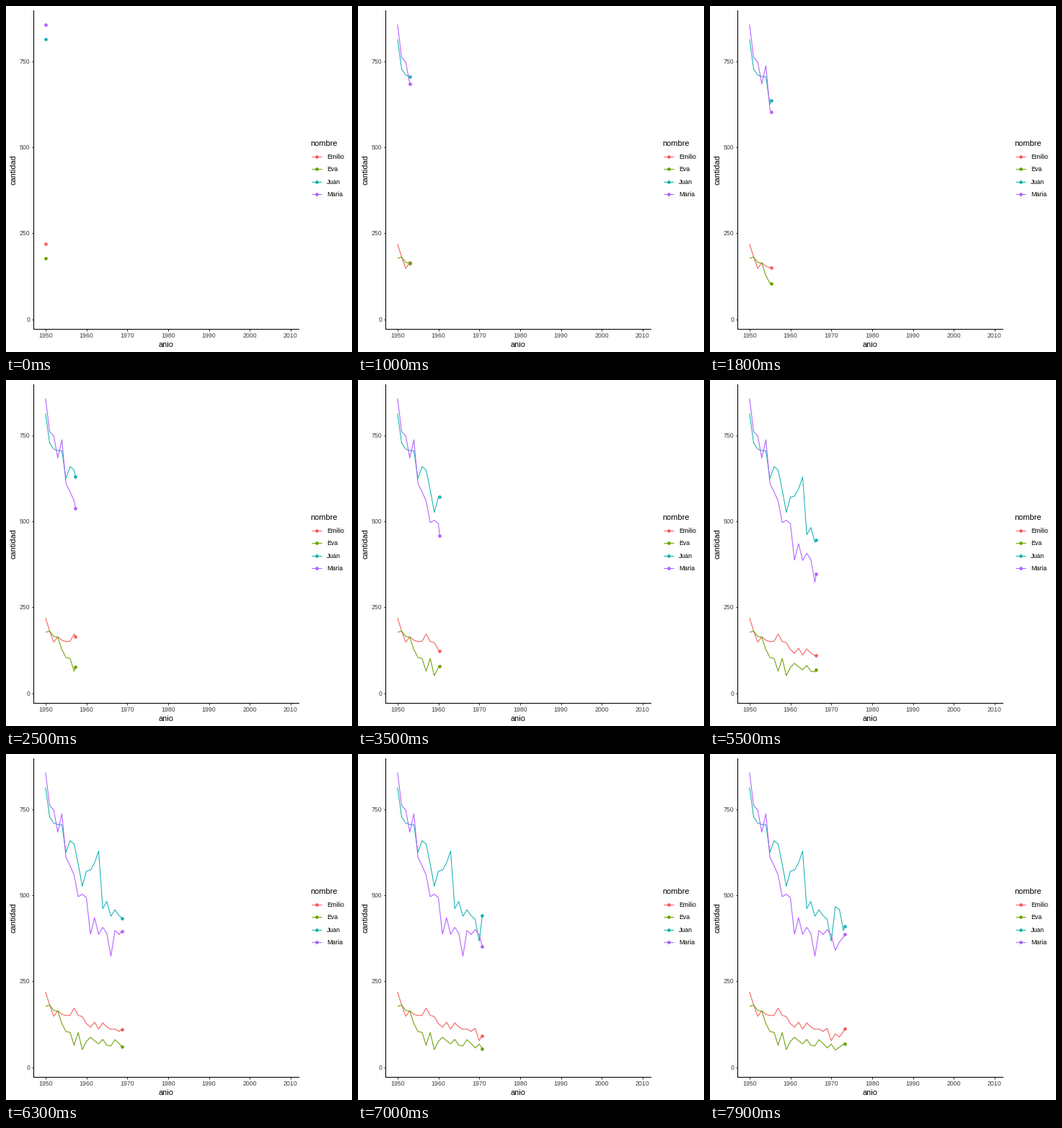
A matplotlib script that plays this animation: 480x480 px, repeating every 8 s.

```python
import matplotlib.pyplot as plt
import numpy as np
from matplotlib.animation import FuncAnimation

SIZE, DPI = 480, 72
FRAMES, INTERVAL = 80, 100
FULL_FRAMES, SPAN = 200, 59  # the whole reveal covers 1950-2009
X0, PX_YEAR = 54.85, 340 / 60
Y0, PX_UNIT = 434.5, 0.477
LEFT, RIGHT, TOP, BOTTOM = 38.3, 406, 5.5, 448.3
LINE, DOT = 1.07, 4.7

SERIES = {
    "Emilio": ("#f35e5a", [219, 181, 148, 164, 154, 150, 151, 172, 151, 147,
                           127, 116, 131, 111, 129, 117, 110, 111, 104, 113,
                           77, 97, 88, 104, 126]),
    "Eva": ("#6ba204", [177, 181, 165, 163, 127, 104, 101, 64, 101, 51,
                        75, 87, 77, 68, 81, 64, 62, 80, 69, 56,
                        67, 50, 58, 67, 68]),
    "Juan": ("#17b3b7", [814, 728, 710, 706, 705, 625, 659, 649, 591, 526,
                         570, 573, 594, 629, 461, 482, 439, 458, 441, 430,
                         366, 467, 459, 397, 433]),
    "Maria": ("#b35eff", [857, 761, 748, 684, 737, 610, 586, 559, 496, 503,
                          493, 387, 435, 386, 407, 389, 323, 398, 386, 400,
                          385, 340, 364, 379, 404]),
}
YEARS = np.arange(25)
# each year falls on a whole frame
KEYS = np.round(YEARS * (FULL_FRAMES - 1) / SPAN)

plt.rcParams["font.family"] = "Liberation Sans"
fig = plt.figure(figsize=(SIZE / DPI, SIZE / DPI), dpi=DPI, facecolor="white")
ax = fig.add_axes([0, 0, 1, 1])
ax.set(xlim=(0, SIZE), ylim=(SIZE, 0))
ax.axis("off")


def px(year):
    return X0 + PX_YEAR * year


def py(value):
    return Y0 - PX_UNIT * np.asarray(value)


def stroke(xs, ys, color, z=2, cap="butt"):
    return ax.plot(xs, ys, color=color, lw=LINE, zorder=z,
                   solid_capstyle=cap)[0]


def dot(x, y, color):
    return ax.plot([x], [y], "o", color=color, ms=DOT, mew=0, zorder=4)[0]


def label(x, y, text, size=8.8, color="black", **kw):
    ax.text(x, y, text, fontsize=size, color=color, va="baseline", **kw)


def draw_axes():
    for v in (0, 250, 500, 750):
        stroke([LEFT - 2.75, LEFT], [py(v)] * 2, "#333333")
        label(33.2, py(v) + 3.2, str(v), color="#404040", ha="right")
    for year in range(0, 61, 10):
        stroke([px(year)] * 2, [BOTTOM, BOTTOM + 2.75], "#333333")
        label(px(year), 460, str(1950 + year), color="#404040", ha="center")
    stroke([LEFT, LEFT], [TOP, BOTTOM], "black", 3, "projecting")
    stroke([LEFT, RIGHT], [BOTTOM, BOTTOM], "black", 3, "projecting")
    label(222, 473, "anio", 11, ha="center")
    label(13.4, 227, "cantidad", 11, ha="center", rotation=90,
          rotation_mode="anchor")


def draw_legend():
    label(422, 194, "nombre", 11)
    for i, (name, (color, _)) in enumerate(SERIES.items()):
        y = 209.1 + 17.28 * i
        stroke([424, 437.9], [y, y], color)
        dot(431, y, color)
        label(445, y + 3.1, name)


draw_axes()
draw_legend()
lines = [stroke([], [], color) for color, _ in SERIES.values()]
dots = [dot(0, 0, color) for color, _ in SERIES.values()]


def update(frame):
    now = np.interp(frame, KEYS, YEARS)
    past = YEARS[YEARS < now]
    xs = px(np.append(past, now))
    for line, point, (_, values) in zip(lines, dots, SERIES.values()):
        ys = py(np.append(values[:len(past)], np.interp(now, YEARS, values)))
        line.set_data(xs, ys)
        point.set_data(xs[-1:], ys[-1:])
    return lines + dots


anim = FuncAnimation(fig, update, frames=FRAMES, interval=INTERVAL,
                     repeat=True, repeat_delay=0)
plt.show()
```
